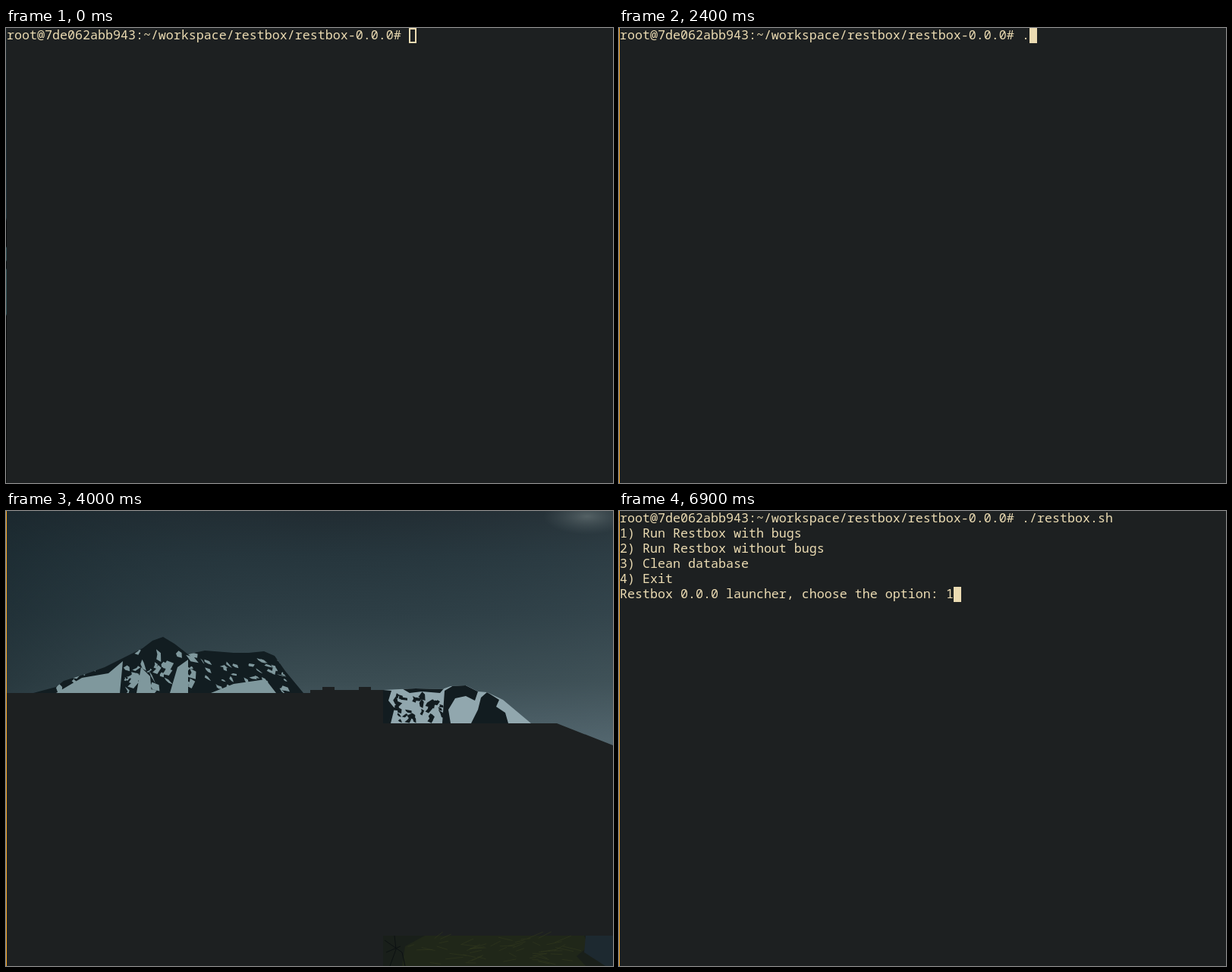
An HTML page for the animation above (8 s loop, 800 by 600 pixels).

```html
<!DOCTYPE html>
<html lang="en">
<head>
<meta charset="utf-8">
<title>Launcher terminal</title>
<style>
  html, body { margin: 0; width: 100%; height: 100%; overflow: hidden; background: #1d2021; }
  #stage { position: relative; width: 800px; height: 600px; overflow: hidden; background: #1d2021; }
  #stage * { animation-duration: 8s; animation-timing-function: step-end; animation-iteration-count: infinite; }

  .text {
    position: absolute; left: 1px; top: -1px; margin: 0; white-space: pre;
    font: 16.667px/20px "Noto Sans Mono", "DejaVu Sans Mono", monospace; color: #ebdbb2;
  }
  .typed { left: 531px; overflow: hidden; animation-name: type; }
  .menu { top: 19px; animation-name: menu; }
  .answer { left: 431px; top: 99px; animation-name: answer; }

  .cursor {
    position: absolute; left: 1px; top: 0; width: 10px; height: 20px; box-sizing: border-box;
    border: 2px solid #ebdbb2; animation-name: move, focus;
  }
  .edge {
    position: absolute; left: 0; top: 0; width: 1px; height: 600px; background: #f9a825;
  }
  .backdrop {
    background: linear-gradient(#1b2529, #14252e 130px, #1b333d 250px, #05090b 255px, #05090b 288px,
      #2d5056 290px, #2d5056 306px, #0a1214 308px, #0a1214 317px, #31565b 319px, #31565b 377px,
      #070a0b 380px, #0c0f0f 600px);
    animation-name: backdrop;
  }
  #scene { position: absolute; left: 0; top: 0; animation-name: scene; }

  @keyframes type {
    0% { width: 0; } 30% { width: 10px; } 31.25% { width: 20px; }
    36.25% { width: 30px; } 37.5% { width: 50px; } 38.75% { width: 60px; }
    41.25%, 100% { width: 130px; }
  }
  @keyframes move {
    0% { transform: translate(530px, 0); } 30% { transform: translate(540px, 0); }
    31.25% { transform: translate(550px, 0); } 36.25% { transform: translate(560px, 0); }
    37.5% { transform: translate(580px, 0); } 38.75% { transform: translate(590px, 0); }
    41.25% { transform: translate(660px, 0); } 51.25% { transform: translate(430px, 100px); }
    86.25%, 100% { transform: translate(440px, 100px); }
  }
  @keyframes focus { 0% { background: transparent; } 17.5%, 100% { background: #ebdbb2; } }
  @keyframes backdrop { 0% { visibility: visible; } 17.5%, 100% { visibility: hidden; } }
  @keyframes scene { 0% { visibility: hidden; } 50% { visibility: visible; } 51.25%, 100% { visibility: hidden; } }
  @keyframes menu { 0% { visibility: hidden; } 51.25%, 100% { visibility: visible; } }
  @keyframes answer { 0% { visibility: hidden; } 86.25%, 100% { visibility: visible; } }
</style>
</head>
<body>
<div id="stage">
  <pre class="text">root@7de062abb943:~/workspace/restbox/restbox-0.0.0# </pre>
  <pre class="text typed">./restbox.sh </pre>
  <pre class="text menu">1) Run Restbox with bugs
2) Run Restbox without bugs
3) Clean database
4) Exit
Restbox 0.0.0 launcher, choose the option: </pre>
  <pre class="text answer">1</pre>
  <div class="cursor"></div>

  <svg id="scene" width="800" height="600" viewBox="0 0 800 600">
    <defs>
      <linearGradient id="sky" x2="0" y2="300" gradientUnits="userSpaceOnUse">
        <stop offset="0" stop-color="#212c32"/>
        <stop offset=".2" stop-color="#26363d"/>
        <stop offset=".45" stop-color="#2d3e45"/>
        <stop offset=".75" stop-color="#3b4d53"/>
        <stop offset="1" stop-color="#50636b"/>
      </linearGradient>
      <linearGradient id="shade" x2="800" y2="0" gradientUnits="userSpaceOnUse">
        <stop offset="0" stop-color="#15242a" stop-opacity=".5"/>
        <stop offset=".5" stop-color="#2a3c43" stop-opacity="0"/>
        <stop offset="1" stop-color="#62757e" stop-opacity=".12"/>
      </linearGradient>
      <radialGradient id="cloud">
        <stop offset="0" stop-color="#5c696c" stop-opacity=".85"/>
        <stop offset="1" stop-color="#4a585d" stop-opacity="0"/>
      </radialGradient>
      <clipPath id="left">
        <path d="M36 240L66 232 76 224 105 215 130 206 152 195 180 181 193 171 207 166 222 175 240 189 262 184 300 187 320 187 340 185 354 191 368 211 392 240Z"/>
      </clipPath>
      <clipPath id="right">
        <path d="M497 236L540 234 575 235 586 231 606 230 622 238 634 239 655 249 692 280H497Z"/>
      </clipPath>
    </defs>
    <rect width="800" height="320" fill="url(#sky)"/>
    <rect width="800" height="320" fill="url(#shade)"/>
    <ellipse cx="766" cy="7" rx="58" ry="24" fill="url(#cloud)"/>
    <g clip-path="url(#left)">
      <rect x="30" y="160" width="370" height="80" fill="#121d21"/>
      <path id="snow" fill="#7f989d"/>
    </g>
    <g clip-path="url(#right)">
      <rect x="497" y="225" width="200" height="60" fill="#91a7ae"/>
      <path id="rock" fill="#121c20"/>
      <path fill="#121c20" d="M497 236L508 237 504 250 512 260 507 280H497ZM520 233H578L572 240 548 238 532 240ZM578 237L590 230H606L622 238 618 250 606 244 592 247 583 262 586 280H575ZM613 280L622 262 626 246 634 239 650 249 646 258 658 266 662 280Z"/>
    </g>
    <path fill="#1d2021" d="M0 240H401V236H417V232H433V236H465V232H481V236H497V280H726L800 309V600H0Z"/>
    <rect x="497" y="560" width="303" height="40" fill="#191f1a"/>
    <path fill="#202719" d="M522 600L526 574 552 560H762L768 574 752 587 764 600Z"/>
    <path fill="#1d2930" d="M764 560H800V600H790L762 582Z"/>
    <path id="twigs" fill="none" stroke="#33391f" stroke-opacity=".6"/>
    <path fill="none" stroke="#0c1112" d="M499 566L522 582 526 600M501 582L520 574M506 600L514 578 512 560"/>
  </svg>

  <div class="edge"></div>
  <div class="edge backdrop"></div>
</div>
<script>
  let seed = 17;
  const rand = (min, max) => {
    seed = (seed * 16807) % 2147483647;
    return min + (max - min) * seed / 2147483647;
  };
  const repeat = (n, make) => Array.from({ length: n }, make).join("");
  const draw = (id, d) => document.getElementById(id).setAttribute("d", d);

  // Ragged patch leaning by `lean` over its height.
  const patch = (x, y, w, h, lean) =>
    `M${x} ${y}l${w * rand(.3, 1)} ${h * .3} ${lean + w * rand(-.4, .3)} ${h * .7} ${-w * rand(.5, 1)} ${-h * .2} ${-lean} ${-h * .4}Z`;

  draw("snow",
    repeat(65, () => patch(rand(50, 245), rand(180, 238), rand(4, 12), rand(5, 18), rand(-6, 4))) +
    repeat(45, () => patch(rand(235, 370), rand(191, 236), rand(3, 8), rand(3, 9), rand(0, 6))) +
    "M66 240L100 220 135 214 154 198 150 240ZM172 240L178 206 190 218 192 240ZM216 240L226 206 240 196V240ZM270 240L300 228 342 222 356 240Z");
  draw("rock", repeat(34, () => patch(rand(500, 572), rand(236, 275), rand(3, 10), rand(4, 13), rand(-5, 3))));
  draw("twigs", repeat(55, () => `M${rand(525, 740)} ${rand(562, 596)}l${rand(8, 24)} ${rand(-9, 6)}`));
</script>
</body>
</html>
```
